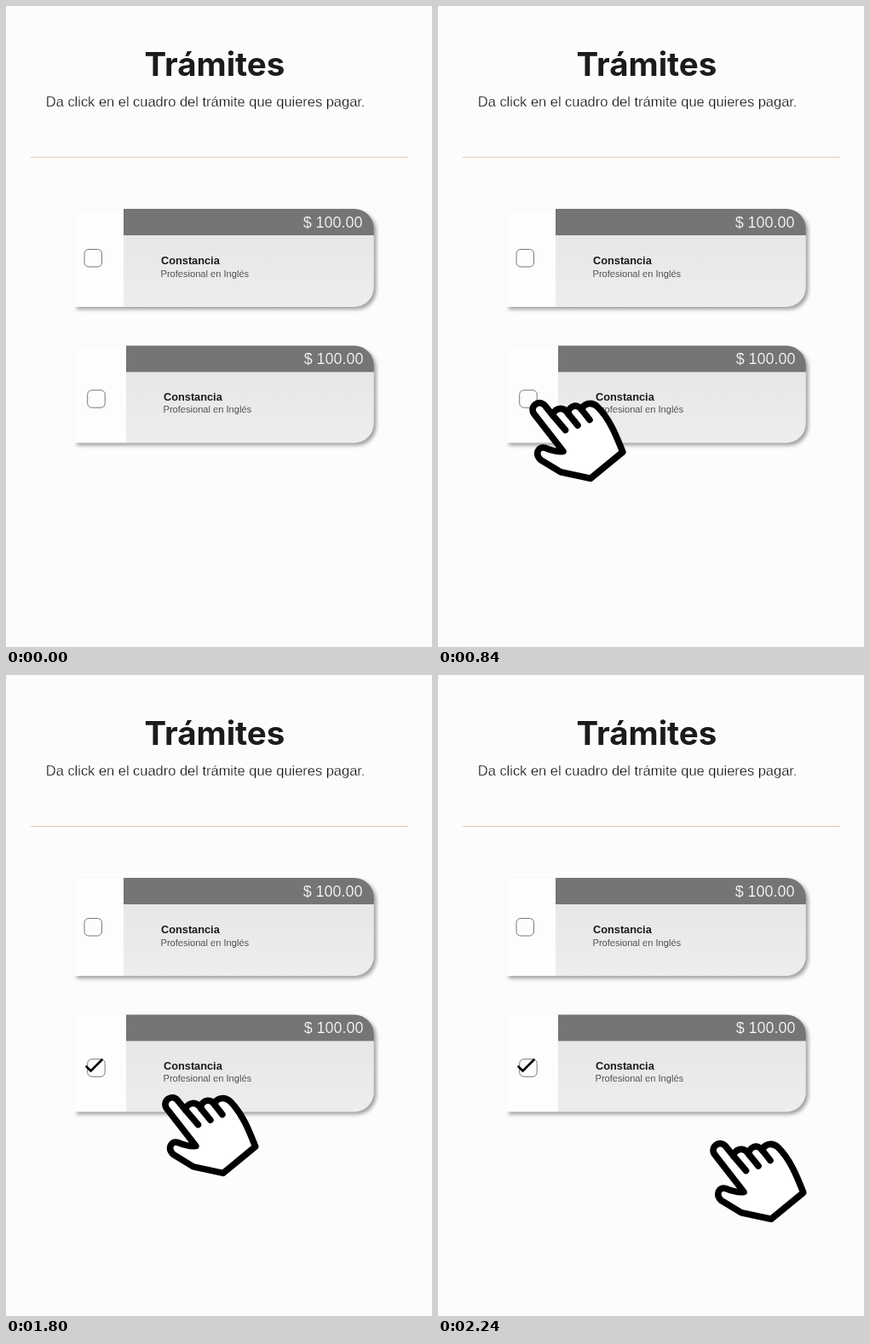
Write an HTML page that moves like this. It is 500x752 px and loops after 3 s.

```html
<!DOCTYPE html>
<html lang="es">
<head>
<meta charset="utf-8">
<title>Trámites</title>
<style>
  html, body { margin: 0; height: 100%; overflow: hidden; background: #fcfcfc; }
  svg { display: block; width: 500px; height: 752px; font-family: "Liberation Sans", Arial, sans-serif; fill: #1b1b1d; }
  .title { font: 700 38.5px Inter, sans-serif; }
  .bold { font-weight: bold; }
  /* A hairline in the backdrop colour thins the letters. */
  .light { fill: #111; stroke: #fcfcfc; stroke-width: .3px; }
  .card { filter: drop-shadow(3px 3px 2px rgba(0, 0, 0, .36)); }
  .box { fill: #fdfdfd; stroke: #77787a; }
  .ink { stroke: #000; stroke-linejoin: round; stroke-linecap: round; }
</style>
</head>
<body>
<svg viewBox="0 0 500 752">
  <defs>
    <linearGradient id="body" x2="0" y2="1">
      <stop stop-color="#e7e7e7"/>
      <stop offset="1" stop-color="#ededed"/>
    </linearGradient>
  </defs>
  <rect width="500" height="752" fill="#fcfcfc"/>
  <text class="title" x="162.5" y="82">Trámites</text>
  <text class="light" x="46.8" y="118" font-size="16.45">Da click en el cuadro del trámite que quieres pagar.</text>
  <path d="M29 177.5H472" stroke="#e8c8b0"/>
  <g id="cards"></g>
  <path id="check" class="ink" d="M94.5 459.5L99.5 464.5L112.5 451.5" fill="none" stroke-width="2.6"/>
  <g id="hand" class="ink" stroke-width="7.6">
    <path fill="#fff" d="M40 61L5.8 17.2A8 8 0 0 1 18.4 7.2L28 19C28 12 39 6 46 17C45 9 56 3 62 12.5C63 5 73 2 80 8.5C94 22 102 42 109.8 61.7L72 92.8L37 85.3L13.5 71C6 64 11 54 19 57C25 59.5 32 62 40 61Z"/>
    <path fill="none" d="M28 19L42.5 36M46 17L57 30.5M62 12.5L71 24"/>
  </g>
</svg>
<script>
const LOOP = 3000, STEP = 40;
const byId = id => document.getElementById(id);
const hand = byId('hand'), check = byId('check');

function card({ left, top, bottom, split, boxX, boxY, textX, nameY, infoY, priceX }) {
  const right = 431.7, r = 23, bar = top + 31;
  return `<g class="card">
      <path fill="#fdfdfd" d="M${left} ${top}H${split}V${bottom}H${left}Z"/>
      <path fill="#747577" d="M${split} ${top}H${right - r}A${r} ${r} 0 0 1 ${right} ${top + r}V${bar}H${split}Z"/>
      <path fill="url(#body)" d="M${split} ${bar}H${right}V${bottom - r}A${r} ${r} 0 0 1 ${right - r} ${bottom}H${split}Z"/>
    </g>
    <rect class="box" x="${boxX}" y="${boxY}" width="20.5" height="20.5" rx="5"/>
    <text x="${priceX}" y="${top + 21.7}" font-size="17.9" fill="#fff" stroke="#747577" stroke-width=".2">$ 100.00</text>
    <text class="bold" x="${textX}" y="${nameY}" font-size="12.75">Constancia</text>
    <text x="${textX - .5}" y="${infoY}" font-size="11.1" fill="#2c2c2e" stroke="#eaeaea" stroke-width=".2">Profesional en Inglés</text>`;
}

byId('cards').innerHTML =
  card({ left: 80, top: 238, bottom: 353, split: 138, boxX: 92, boxY: 285.5, textX: 182, nameY: 303, infoY: 318, priceX: 348.7 }) +
  card({ left: 80, top: 398.6, bottom: 512.5, split: 141, boxX: 95.7, boxY: 450.7, textX: 185, nameY: 463, infoY: 476.5, priceX: 349.7 });

const REST = [319, 545.5], TARGET = [107, 461.5], BEND = [213, 536];
const mix = (a, b, k) => a.map((v, i) => v + (b[i] - v) * k);

// Progress of the way back, as [time, share of the distance]
const BACK = [[1600, 0], [1640, .061], [1800, .358], [2080, .912], [2160, .971], [2240, 1]];

function slope(keys, i) {
  const a = keys[Math.max(i - 1, 0)], b = keys[Math.min(i + 1, keys.length - 1)];
  return (b[1] - a[1]) / (b[0] - a[0]);
}

// Smooth curve through the keys
function spline(keys, t) {
  const i = Math.min(keys.findLastIndex(k => k[0] <= t), keys.length - 2);
  const [t0, v0] = keys[i], [t1, v1] = keys[i + 1], d = t1 - t0;
  const u = (t - t0) / d, w = 1 - u;
  return v0 * w * w * (1 + 2 * u) + v1 * u * u * (1 + 2 * w)
    + d * u * w * (w * slope(keys, i) - u * slope(keys, i + 1));
}

function handAt(t) {
  if (t < 840) {
    const u = (t - 440) / 400, k = u * (1.55 - .1 * u - .45 * u * u);
    return mix(mix(REST, BEND, k), mix(BEND, TARGET, k), k);
  }
  if (t < 1600) return TARGET;
  return t < 2240 ? mix(TARGET, REST, spline(BACK, t)) : REST;
}

function draw(now) {
  const t = Math.floor(now % LOOP / STEP) * STEP;
  hand.style.display = t < 440 ? 'none' : '';
  check.style.display = t < 1240 ? 'none' : '';
  if (t >= 440) hand.setAttribute('transform', `translate(${handAt(t)})`);
}

const start = performance.now();
function tick() {
  draw(performance.now() - start);
  requestAnimationFrame(tick);
}
tick();
</script>
</body>
</html>
```
